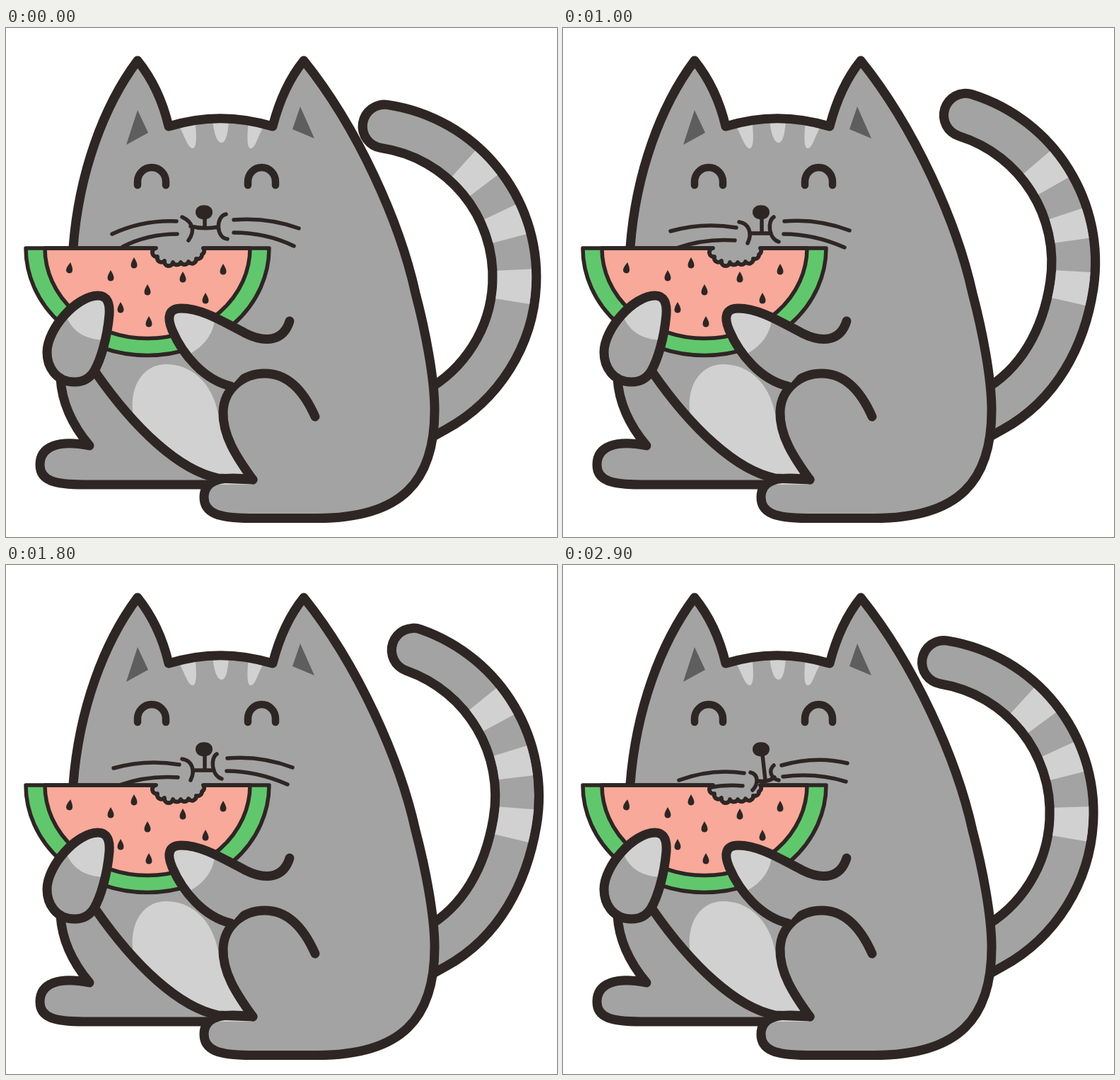
An HTML page with a canvas that plays this animation: 779 by 719 pixels, repeating every 3000 ms.

```html
<!DOCTYPE html>
<html lang="en">
<head>
<meta charset="utf-8">
<title>Cat eating watermelon</title>
<style>
  html, body { margin: 0; width: 100%; height: 100%; overflow: hidden; background: #fff; }
  canvas { display: block; }
</style>
</head>
<body>
<canvas id="stage" width="779" height="719"></canvas>
<script>
const ctx = document.getElementById('stage').getContext('2d');
const DARK = '#2e2624', GREY = '#a3a3a3', LIGHT = '#d1d1d1', EAR = '#5e5e5e';
const GREEN = '#61c76d', PINK = '#f8a999';
const LOOP = 3000, TICK = 100, POSE_TIME = 200;

const path = d => new Path2D(d);

const body = path(`M95,310 C103,205 138,110 186,46 C207,72 222,105 230,139
  C278,124 328,124 377,139 C386,104 400,72 421,46
  C498,142 557,275 579,375 C593,428 606,495 606,540
  C606,640 560,692.5 440,692.5 L345,692.5 C300,692.5 280,685 280,663
  C280,638 305,632 349,638 L300,636 C245,625 182,566 127,487
  C105,450 92,380 95,310 Z`);
const belly = path(`M179,540 C176,500 198,475 226,475 C262,475 291,500 300,545
  C302,575 325,608 349,638 L349,645 L179,645 Z`);
const thigh = path('M349,638 C325,605 306,575 307,542 C308,510 335,488 366,488 C400,488 422,515 437,549');
const backLeg = path(`M77,495 C79,530 93,560 118,590 C75,581 48,591 48,617
  C48,640 70,645 110,645 L300,645`);
const leftPaw = path(`M97,500 C70,500 58,478 58,458 C58,425 100,378 130,378
  C144,378 147,390 146,405 C143,440 133,470 125,484 C118,496 108,500 97,500 Z`);
const leftPawTip = path('M50,370 L84,405 C95,432 115,441 145,441 L160,360 Z');
const rightArm = path(`M318,506 C280,497 250,462 235,427 C227,408 230,396 248,396
  C275,396 302,412 338,431 C370,447 393,440 401,414`);
const rightPawTip = path('M220,380 L296,400 C296,430 282,447 262,459 L220,460 Z');

const ears = path('M186,116 L201,148 L170,165 Z M416,111 L436,156 L405,143 Z');
const foreheadStripes = path(`M243,136 L267,131 C270,150 270,170 264,170 C257,170 252,150 243,136 Z
  M292,130 L315,130 C314,148 311,162 305,162 C298,162 294,148 292,130 Z
  M343,131 L366,136 C356,152 353,170 346,170 C340,170 341,150 343,131 Z`);
const eyes = path(`M186,222 V217 A20,20 0 0 1 226,217 V222
  M342,222 V217 A19.5,20 0 0 1 381,217 V222`);

const bite = [[214, 323], [224, 329], [236, 331], [247, 331],
  [258, 330], [269, 326], [277, 320], [279, 311]]
  .map(([x, y]) => `A6,6 0 0 0 ${x},${y}`).join(' ');
const topEdge = `L212,311 ${bite}`;
const rind = path(`M28,311 ${topEdge} L372,311 A172,151.5 0 0 1 28,311 Z`);
const flesh = path(`M55,311 ${topEdge} L345,311 A145,127.5 0 0 1 55,311 Z`);
const seeds = [[90, 339, .15], [148, 350, 0], [181, 332, 0], [200, 370, 0], [250, 352, 0],
  [307, 341, 0], [282, 382, 0], [162, 395, 0], [202, 415, 0]];
const seed = path('M0,-8 C2,-4 4.5,-1 4.5,3 C4.5,9 -4.5,9 -4.5,3 C-4.5,-1 -2,-4 0,-8 Z');

// Chewing poses: whiskers, cheeks, mouth line, stem below the nose.
const chewing = [
  `M150,291 Q193,271 241,273 M165,309 Q200,291 242,291
   M322,271 Q370,267 414,283 M322,289 Q368,289 407,308
   M249,267 C264,274 268,286 258,300 M311,263 C296,266 297,297 313,298
   M261,280 Q280,285 300,281 M281,268 V282`,
  `M152,287 Q198,274 245,282 M160,311 Q200,297 243,300
   M313,273 Q360,269 405,286 M312,291 Q355,291 398,310
   M249,274 C263,276 268,290 261,304 M298,267 C289,272 290,297 305,302
   M264,290 H294 M281,268 V290`,
  `M164,304 Q210,287 256,294 M170,325 Q215,308 254,312
   M309,283 Q357,269 402,280 M311,299 Q357,293 400,306
   M265,293 C277,296 276,310 268,318 M298,283 C290,290 294,302 305,304
   M275,305 Q290,307 299,300 M282,268 L286,304`,
  `M163,278 Q210,267 256,279 M167,303 Q208,292 253,296
   M311,280 Q360,276 403,294 M310,297 Q355,299 395,318
   M260,275 C277,274 276,301 263,300 M305,271 C293,275 292,296 304,300
   M275,289 L299,292 M282,268 L285,290`
].map(path);

function fill(shape, color) {
  ctx.fillStyle = color;
  ctx.fill(shape);
}

function stroke(shape, width = 13, color = DARK) {
  ctx.lineWidth = width;
  ctx.strokeStyle = color;
  ctx.stroke(shape);
}

function fillInside(mask, shape, color) {
  ctx.save();
  ctx.clip(mask);
  fill(shape, color);
  ctx.restore();
}

function drawTail(swing) {
  const at = (x, y, dx, dy) => [x + dx * swing, y + dy * swing];
  const tail = new Path2D();
  tail.moveTo(...at(535, 139, 51.4, -23.6));
  tail.bezierCurveTo(...at(644.4, 155.2, 40.8, .2), ...at(723.9, 251.5, 17.1, 8.5),
    ...at(718.7, 362, .9, 2.1));
  tail.bezierCurveTo(...at(715.2, 436.7, -10.7, 1), 672.5, 504, 607, 540);
  tail.lineTo(580, 555);
  stroke(tail, 75);
  stroke(tail, 48.5, GREY);

  const shrink = 1 - .04 * swing;
  ctx.save();
  ctx.lineCap = 'butt';
  ctx.setLineDash([0, 125.5, 42, 44, 40, 44.7, 44.7, 9999].map(v => v * shrink));
  stroke(tail, 48.5, LIGHT);
  ctx.restore();
}

function drawBody() {
  fill(backLeg, GREY);
  fill(path('M77,495 L127,487 L300,640 L118,590 Z'), GREY);
  stroke(backLeg);
  fill(body, GREY);
  fillInside(body, belly, LIGHT);
  fillInside(body, foreheadStripes, LIGHT);
  stroke(body);
  stroke(thigh);
}

function drawFace(pose) {
  fill(ears, EAR);
  stroke(eyes, 10.5);
  fill(path('M268,260 C268,247 292,247 292,260 C292,274 268,274 268,260 Z'), DARK);
  stroke(chewing[pose], 5.5);
}

function drawMelon() {
  fill(rind, GREEN);
  fill(flesh, PINK);
  stroke(flesh, 5.5);
  stroke(rind, 5.5);
  for (const [x, y, tilt] of seeds) {
    ctx.save();
    ctx.translate(x, y);
    ctx.rotate(tilt);
    fill(seed, DARK);
    ctx.restore();
  }
}

function drawArm(arm, tip) {
  fill(arm, GREY);
  fillInside(arm, tip, LIGHT);
  stroke(arm);
}

function draw(now) {
  const time = Math.floor((now % LOOP) / TICK) * TICK;
  const swing = 1 - Math.abs(1 - time / (LOOP / 2));
  const pose = Math.floor(time / POSE_TIME) % chewing.length;

  ctx.fillStyle = '#fff';
  ctx.fillRect(0, 0, 779, 719);
  ctx.lineCap = ctx.lineJoin = 'round';
  drawTail(swing);
  drawBody();
  drawFace(pose);
  drawMelon();
  drawArm(leftPaw, leftPawTip);
  drawArm(rightArm, rightPawTip);
}

const start = performance.now();
function loop() {
  draw(performance.now() - start);
  requestAnimationFrame(loop);
}
loop();
</script>
</body>
</html>
```
